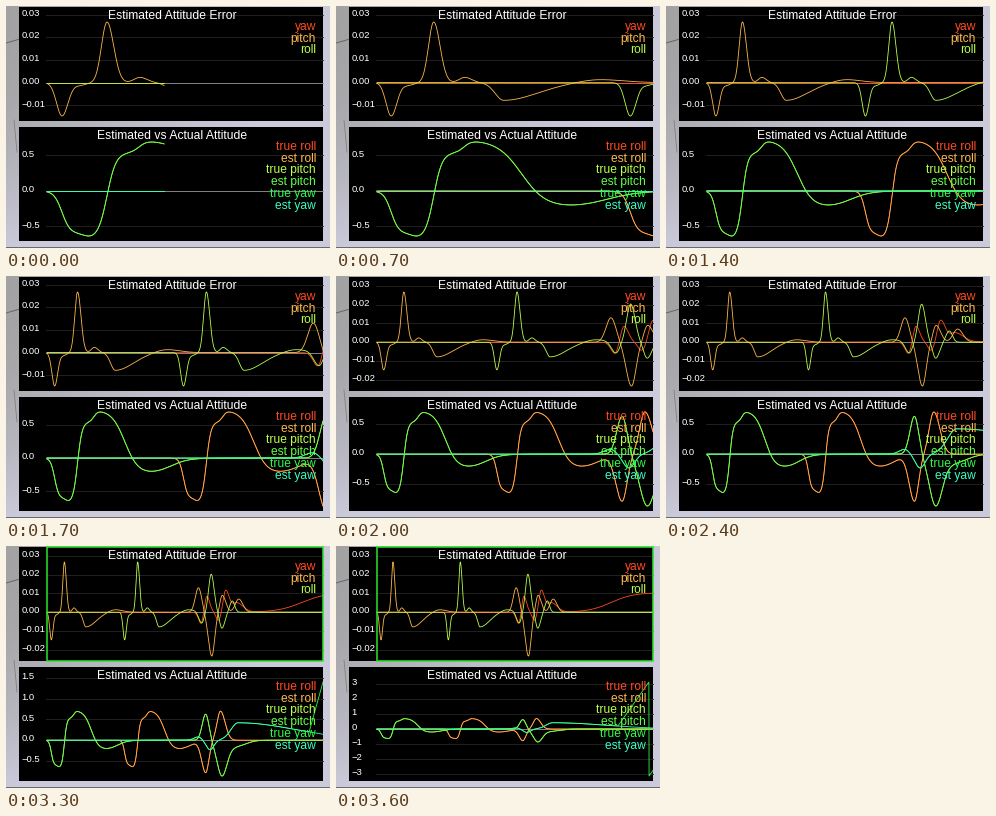
A matplotlib script for the animation above (3.7 s loop, 324x242 px).

```python
import numpy as np
import matplotlib.pyplot as plt
from matplotlib.animation import FuncAnimation
from matplotlib.patches import Rectangle

W, H, DPI = 324, 242, 100
FRAMES, INTERVAL = 37, 100
LEFT, RIGHT = 13, 317          # panel edges
X0, SPAN = 41, 276             # plotting area
FIT = 94                       # height given to the data range
ROLL_DELAY = 253               # the pitch manoeuvre is repeated in roll

RED, ORANGE, LIME = "#ff4a20", "#ffb84a", "#b8ff4a"
GREEN, TRUE_GREEN, CYAN = "#62ff46", "#30f848", "#38ffc0"


def bump(u, centre, rise, fall, height):
    """Bell curve with its own width on each side."""
    width = np.where(u < centre, rise, fall)
    return height * np.exp(-((u - centre) / width) ** 2 / 2)


def step(u, centre, width, height):
    return height * (1 + np.tanh((u - centre) / width)) / 2


def error_move(u):
    return (bump(u, 15, 5.5, 6, -14.7) + bump(u, 33, 6, 6, -1.2)
            + bump(u, 60, 5.5, 6.7, 26.7) + bump(u, 93, 6, 7, 2.3)
            + bump(u, 134, 9, 35, -7.8) + bump(u, 234, 20, 25, 1.4))


def angle_move(u):
    return (step(u, 15, 8, -.60) + step(u, 38, 8, -.08) + step(u, 60, 9, 1.22)
            + step(u, 92, 8, .18) + step(u, 153, 26, -.96) + step(u, 243, 35, .24))


def pitch_error(u):
    combined = (bump(u, 523, 11, 11, 13) + bump(u, 569, 12, 10, -23.3)
                + bump(u, 605, 8, 12, 9) + bump(u, 662, 12, 14, 7))
    return (error_move(u) + combined) / 1000


def roll_error(u):
    combined = (bump(u, 534, 10, 8, -6) + bump(u, 567, 9, 10, 20.2)
                + bump(u, 604, 8, 10, -8.5) + bump(u, 640, 9, 8, 6))
    return (error_move(u - ROLL_DELAY) + combined) / 1000


def yaw_error(u):
    combined = (bump(u, 532, 9, 7, -6) + bump(u, 552, 7, 10, 8.5)
                + bump(u, 592, 8, 9, -4.5) + bump(u, 617, 9, 12, 11.6)
                + bump(u, 655, 15, 22, 5))
    return (combined + step(u, 880, 85, 10.4)) / 1000


def pitch(u):
    return (angle_move(u) + bump(u, 548, 12, 11, .63)
            + bump(u, 604, 17, 18, -.85) + bump(u, 650, 20, 35, -.15))


def roll(u):
    return (angle_move(u - ROLL_DELAY) + bump(u, 548, 14, 11, -.77)
            + bump(u, 599, 12, 16, .7))


def est_yaw(u):
    return (bump(u, 522, 15, 12, .08) + bump(u, 563, 13, 13, -.23)
            + bump(u, 660, 25, 200, .42))


def true_yaw(u):
    """Spins up at the end and wraps at half a turn."""
    angle = est_yaw(u) + np.maximum(0, u - 905) * .0262
    return (angle + np.pi) % (2 * np.pi) - np.pi


def recorded(frame):
    """Recording length: it speeds up at frame 20 and stalls once at 29."""
    return 117 + 25 * frame + 3 * max(frame - 20, 0) - 28 * (frame >= 29)


fig = plt.figure(figsize=(W / DPI, H / DPI), dpi=DPI)
ax = fig.add_axes([0, 0, 1, 1])
ax.set_axis_off()


def text(x, y, s, px, color="white", ha="left"):
    return ax.text(x, y, s, fontsize=px * 72 / DPI, family="Liberation Sans",
                   color=color, ha=ha, va="baseline", zorder=5)


def nice_interval(px_per_unit):
    """Smallest 1 or 5 times a power of ten that leaves room for labels."""
    sizes = (base * 10.0 ** power for power in range(-3, 2) for base in (1, 5))
    return next(size for size in sizes if size * px_per_unit > 14.5)


class Panel:
    def __init__(self, top, title, series):
        self.top, self.bottom = top, top + 115
        self.series = series
        self.ticks = []
        box = Rectangle((LEFT, top + 1), RIGHT - LEFT, 114, color="black", lw=0)
        ax.add_patch(box)
        text(166.5, top + 13, title, 12.1, ha="center")
        self.lines = []
        for i, (name, color, _) in enumerate(series):
            text(310, top + 24 + 11.7 * i, name, 12, color, "right")
            line, = ax.plot([], [], color=color, lw=.6, zorder=4)
            line.set_clip_path(box)
            self.lines.append(line)

    def draw(self, length):
        u = np.append(np.arange(0, length, .75), length)
        data = [f(u) for _, _, f in self.series]
        low, high = np.min(data), np.max(data)
        scale = FIT / (high - low)
        zero = self.top + 16 + high * scale
        x = X0 + u * min(1, SPAN / length)
        for line, values in zip(self.lines, data):
            line.set_data(x, zero - values * scale)
        self.draw_ticks(zero, scale)

    def draw_ticks(self, zero, scale):
        for artist in self.ticks:
            artist.remove()
        self.ticks = []
        size = nice_interval(scale)
        digits = 2 if size < .1 else 1 if size < 1 else 0
        for n in range(-8, 9):
            y = zero - n * size * scale
            if self.top + 4 < y < self.bottom:
                shade = ".6" if n == 0 else ".15"
                grid, = ax.plot([X0 - 1, RIGHT], [y, y], color=shade, lw=.6, zorder=3)
                label = f"{n * size:.{digits}f}".replace("-", "\u2212")
                self.ticks += [grid, text(15.5, y + 1.2, label, 9.5)]


# Pale scene showing around the panels
yy, xx = np.mgrid[0:H, 0:W]
blend = np.clip(xx / W + (yy / H) ** 2, 0, 1)[..., None]
backdrop = (1 - blend) * np.array([162, 162, 163]) + blend * np.array([203, 202, 219])
ax.imshow(backdrop / 255, extent=(0, W, H, 0), aspect="auto", zorder=0)
ax.plot([0, 14], [37, 33], color=".4", lw=.7, zorder=.5)
ax.plot([8, 11], [114, 146], color=".5", lw=.6, zorder=.5)
ax.plot([0, W], [241, 241], color=".4", lw=.7, zorder=.5)

panels = [
    Panel(0, "Estimated Attitude Error", [
        ("yaw", RED, yaw_error), ("pitch", ORANGE, pitch_error),
        ("roll", LIME, roll_error)]),
    Panel(120, "Estimated vs Actual Attitude", [
        ("true roll", RED, roll), ("est roll", ORANGE, roll),
        ("true pitch", LIME, pitch), ("est pitch", GREEN, pitch),
        ("true yaw", TRUE_GREEN, true_yaw), ("est yaw", CYAN, est_yaw)]),
]
highlight = Rectangle((X0 - .5, .8), RIGHT - X0, 114, fill=False,
                      edgecolor="#28e628", lw=1.1, zorder=6)
ax.add_patch(highlight)
ax.set_xlim(0, W)
ax.set_ylim(H, 0)


def update(frame):
    for panel in panels:
        panel.draw(recorded(frame))
    highlight.set_visible(frame >= 30)
    return []


animation = FuncAnimation(fig, update, frames=FRAMES, interval=INTERVAL,
                          init_func=lambda: [], repeat=True, repeat_delay=0)
plt.show()
```
